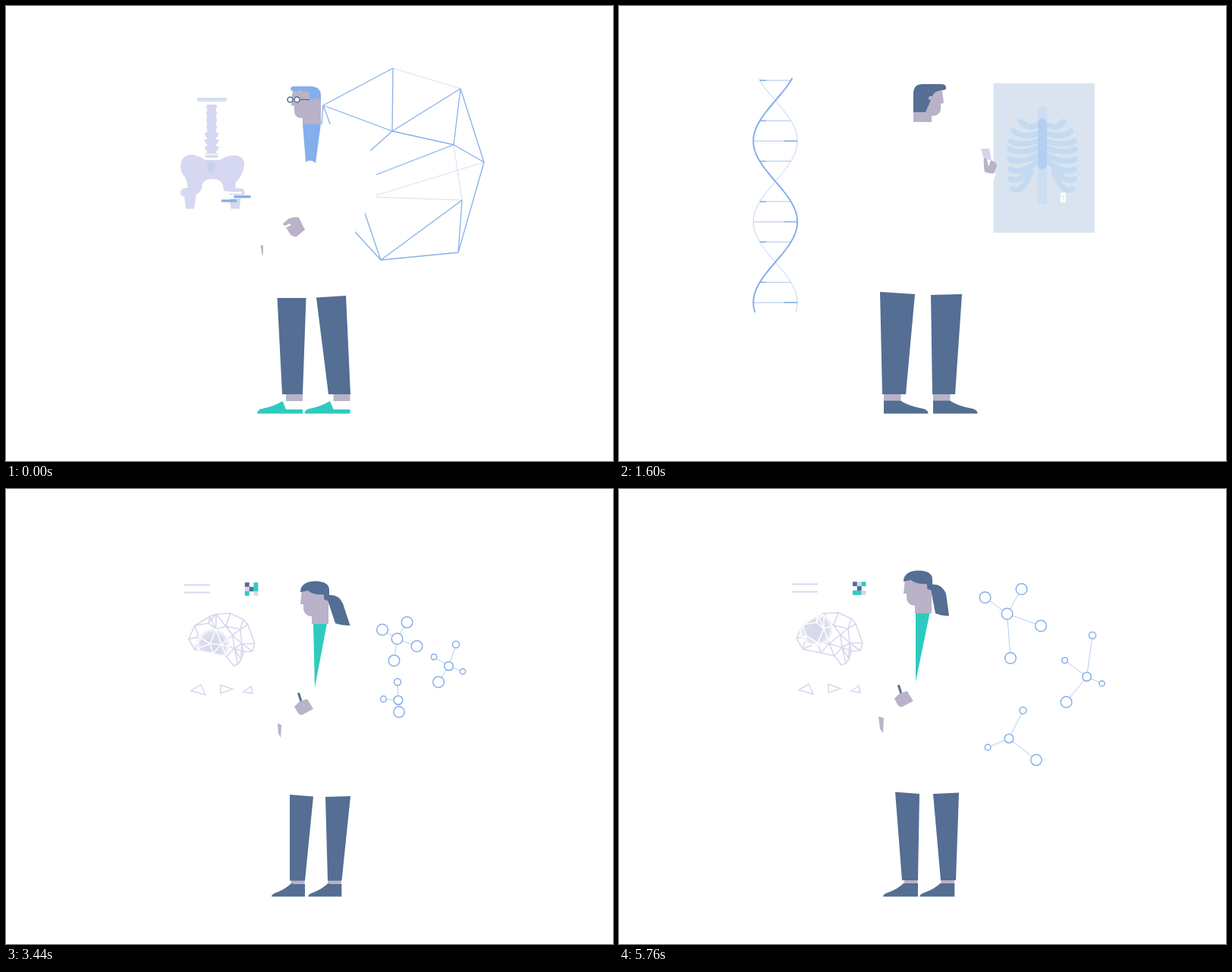
Recreate the animation shown at these times as an HTML page with a canvas. Size 800 by 600 pixels, loop 5800 ms.

```html
<!DOCTYPE html>
<html lang="en">
<head>
<meta charset="utf-8">
<title>Medical scenes</title>
<style>
  html, body { margin: 0; width: 100%; height: 100%; overflow: hidden; background: #fff; }
  canvas { display: block; }
</style>
</head>
<body>
<canvas id="stage" width="800" height="600"></canvas>
<script>
const ctx = document.getElementById('stage').getContext('2d');
const LOOP = 5800, STEP = 40, SECOND = 1500, THIRD = 3000;
const NAVY = '#546e94', SKIN = '#b9b2c8', SKY = '#84aeec', TEAL = '#2fcabf',
      LILAC = '#d6d7f0', LINE = '#86b0ea', PALE = '#ccd5ee';

const lerp = (a, b, p) => a + (b - a) * p;
const clamp = x => Math.max(0, Math.min(1, x));
const smooth = x => { x = clamp(x); return x * x * (3 - 2 * x); };
const easeOut = x => 1 - (1 - clamp(x)) ** 3;

// Value at time t along [time, value] stops.
function keyed(t, stops) {
  let i = 0;
  while (i < stops.length - 2 && t > stops[i + 1][0]) i++;
  const [t0, a] = stops[i], [t1, b] = stops[i + 1];
  return lerp(a, b, smooth((t - t0) / (t1 - t0)));
}

// Blends two paths that share the same commands.
function blend(a, b, p) {
  const ends = b.match(/-?[\d.]+/g);
  let i = 0;
  return a.replace(/-?[\d.]+/g, n => lerp(+n, +ends[i++], p).toFixed(2));
}

function fill(color, path, other, p) {
  ctx.fillStyle = color;
  ctx.fill(new Path2D(other ? blend(path, other, p) : path));
}

function stroke(color, width, path) {
  ctx.strokeStyle = color;
  ctx.lineWidth = width;
  ctx.stroke(new Path2D(path));
}

function rect(color, x, y, w, h) {
  ctx.fillStyle = color;
  ctx.fillRect(x, y, w, h);
}

function ring(x, y, r, color, width) {
  ctx.beginPath();
  ctx.arc(x, y, r, 0, 7);
  ctx.fillStyle = '#fff';
  ctx.strokeStyle = color;
  ctx.lineWidth = width;
  ctx.fill();
  ctx.stroke();
}

function moved(dx, dy, draw, angle = 0, px = 0, py = 0) {
  ctx.save();
  ctx.translate(dx + px, dy + py);
  ctx.rotate(angle * Math.PI / 180);
  ctx.translate(-px, -py);
  draw();
  ctx.restore();
}

/* ---------- Scene 1: skeleton scan and network ---------- */

// Node positions as [x, y, later x, later y].
const nodes = {
  A: [418, 131, 412, 131], B: [510, 82, 503, 81], C: [599, 109, 602, 107],
  D: [630, 206, 655, 206], E: [596, 325, 603, 325], F: [494, 335, 487, 335],
  G: [509, 165, 484, 166], H: [590, 183, 570, 184], I: [601, 256, 587, 256],
  K: [467, 256, 492, 256], L: [430, 250, 440, 252], M: [450, 218, 448, 204],
  N: [440, 241, 440, 239], O: [430, 265, 430, 279], P: [440, 190, 446, 184],
  Q: [414, 180, 412, 175], R: [444, 182, 440, 175]
};

function network(p) {
  const at = k => lerp(nodes[k][0], nodes[k][2], p) + ' ' + lerp(nodes[k][1], nodes[k][3], p);
  const path = pairs => pairs.split(' ').map(e => `M${at(e[0])}L${at(e[1])}`).join('');
  stroke(PALE, .8, path('BC HI DK IL'));
  ctx.globalAlpha = clamp(p);
  stroke(PALE, .8, path('DI'));
  ctx.globalAlpha = 1;
  stroke(LINE, 1.3, path('AB AG BG GC CH CD HD GH DE EI EF FI GM HN FK KR FO AP AQ'));
  fill('#fff',
    'M400 156 H430 Q462 160 480 190 Q486 202 488 222 L488 251 Q484 264 473 273 L460 298 L460 345 H400 Z',
    'M400 150 H425 Q456 160 468 183 Q472 202 474 226 L468 254 Q464 272 460 280 L458 306 L458 345 H400 Z', p);
}

function skeleton(p) {
  const q = clamp(p);
  const femur = 'M230 246Q230 239 240 240L251 245L248 267.500H237L235 251Q230 251 230 246Z';
  rect('#d6dff4', 252, 121, 38.5, lerp(5, 74, q));
  const bone = q > .5 ? '#c5d1ee' : LILAC;
  rect(bone, 265, lerp(130, 126, q), 12, lerp(70, 69, q));
  for (let y = 131; y < 198; y += 9) {
    const spread = y > 165 ? 9.5 : 7.5;
    fill(y < 195 ? bone : LILAC, `M${271 - spread} ${y}H${271 + spread}L${269 + spread} ${y + 6}H${273 - spread}Z`);
  }
  rect('#fff', 262, 195, 18, 1.5);
  fill(LILAC, 'M230 211Q231 196 246 196Q256 198 262 203H282Q292 196 302 197Q314 198 314 210Q312 224 303 232L302 245L287 244Q287 228 272 228Q258 228 258 240Q256 247 249 249L240 245Q240 235 236 226Q230 220 230 211Z');
  fill(LILAC, femur);
  ctx.save();
  ctx.translate(544.5, 0);
  ctx.scale(-1, 1);
  fill(LILAC, femur);
  ctx.restore();
  rect('#c6d3f0', 265, 206, 10, 12);
  rect('#fff', lerp(288, 288, q), 245, lerp(23, 19, q), 2.5);
  rect('#fff', 289, 249, 36, 5);
  rect(SKY, lerp(300.5, 284, q), 249.7, lerp(22, 40.5, q), 3.5);
  rect(SKY, 284, 255.3, lerp(20, 0, q), 3.3);
}

function manWithGlasses(p) {
  for (const x of [0, 62.5]) {
    moved(x, 0, () => {
      rect(SKIN, 369, 512, 22, 9);
      fill(TEAL, 'M331 537.500Q331 532 338 531Q353 528 364.500 521L369 532H391V537.500Z');
    });
  }
  fill(NAVY, 'M357.500 385L395.500 385L391 512L364 512Z', 'M353 381.500L391 382L391 512L364 512Z', p);
  fill(NAVY, 'M409 384.500L448 382L454 512L425 512Z', 'M406 381L445.500 379L454 512L425 512Z', p);
  fill(SKY, 'M391 155L415 155L408 207Q401 201 395 206Z', 'M388 152L412 152L406 198L398 198Q397 193 391.500 193Z', p);
  fill(SKIN, 'M335.500 315L339 316L338.500 330L337 326Z', 'M328.500 311L337 314L335.500 336L331 326Z', p);
  moved(-29.5 * p, -17 * p, () =>
    fill(SKIN, 'M365 287L373 280Q384 277 386 279L394 295L383 304Q377 305 374 300L369 292L376 289L374 287L367 290Z'),
    11 * p, 380, 290);
  moved(-3 * p, -3 * p, () => {
    fill(SKIN, 'M378 112L400 110L415 121V156H391V148Q380 148 380 138V132L376 131L377 118Z');
    fill(SKY, 'M375 110Q375 106 379 106H403Q415 107 415 118V126L411 121L400 124V114Q396 111 392 113Q387 109 384 113L377 112Z');
    ring(374.5, 123.5, 3.5, NAVY, 1.5);
    ring(383.5, 123.5, 3.5, NAVY, 1.5);
    stroke(NAVY, 1.3, 'M387 123.500H400');
  }, -4 * p, 403, 156);
}

function sceneOne(t) {
  const p = t / 1080;
  network(p);
  skeleton(p);
  manWithGlasses(Math.min(p, 1.1));
}

/* ---------- Scene 2: helix and X-ray ---------- */

function helix(centre, low) {
  const period = 213, swing = 29;
  const offset = y => swing * Math.cos(2 * Math.PI * (y - low) / period);
  const strand = sign => {
    let path = '';
    for (let y = 95; y <= 404; y += 3) path += `${path ? 'L' : 'M'}${centre + sign * offset(y)} ${y}`;
    return path;
  };
  stroke('#c4d3f1', 1, strand(1));
  for (let i = -24; i < 24; i++) {
    const y = low + i * period / 8;
    if (i % 4 === 2 || i % 4 === -2 || y < 95 || y > 404) continue;
    const w = Math.abs(offset(y));
    stroke('#bdd1f1', 1.2, `M${centre - w} ${y}H${centre + w}`);
    const start = i % 4 ? -w : w * .4;
    stroke(LINE, 1.5, `M${centre + start} ${y}h${i % 4 ? 8 : w * .6}`);
  }
  stroke(LINE, 2, strand(-1));
}

function xray(p, slide) {
  ctx.save();
  ctx.translate(572 + slide, 200.5);
  ctx.scale(lerp(1.075, 1, p), lerp(1.031, 1, p));
  ctx.translate(-572, -200.5);
  rect('#d9e4f0', 448, 105, 124, 191);
  rect('#cbdef2', 502.5, 135, 11, 124);
  ctx.lineCap = 'round';
  // Each rib: start drop, tip reach, tip height.
  [[158, 26, 154], [169, 35, 166], [179, 39, 179], [188, 40, 189], [197, 40, 202],
   [205, 39, 215], [211, 39, 227], [218, 36, 240]].forEach(([y, reach, tip], i) => {
    for (const side of [-1, 1]) {
      const from = 508 + side * (i > 5 ? 14 : 6);
      stroke('#c4daf1', 7, `M${from} ${y}Q${508 + side * reach * .7} ${Math.max(y, tip) + 7} ${508 + side * reach} ${tip}`);
    }
  });
  ctx.lineCap = 'butt';
  fill('#b3cff0', 'M502.500 155Q503 150 508 150Q513 150 513.500 155V211Q512 215 508 215Q504 215 502.500 211Z');
  ctx.restore();

  ctx.save();
  ctx.translate(lerp(530.5, 533.5, p) + slide, lerp(252.5, 251, p));
  const w = lerp(7, 45, p), h = lerp(13, 28, p);
  rect('#fff', -w / 2, -h / 2, w, h);
  rect('#d3e1f1', 3 - w / 2, 3 - h / 2, Math.max(1, w - 6), h - 6);
  if (p > .3) {
    const q = clamp((p - .3) / .7);
    rect('#fff', -16.5, -7.5, 24 * q, 2.5);
    rect('#fff', -16.5, -2, 33 * q, 2.5);
    rect(SKY, -16.5, 3.5, 19 * q, 3);
  }
  ctx.restore();
}

function manAtScreen(p) {
  fill('#fff',
    'M410 155H439Q467 154 475 180L482 219L497 220Q486 250 483 258Q480 265 473 265H461L465 301H400Z',
    'M410 160H448Q470 168 477 205L479 230L480 236Q476 250 462 262Q462 264 461 265H459L461 301H400Z', p);
  ctx.globalAlpha = 1 - p;
  fill('#d3d6ea', 'M477 188L488 188L491 203L481 202Z');
  ctx.globalAlpha = 1;
  fill(SKIN,
    'M482 219Q480 208 481 200L485 202L487 212L490 203L497 207L498 211L494 221Q488 221 482 219Z',
    'M437 262Q438 256 448 251L470 237L470 233L473 227L476 227L474 234L480 235Q478 250 460 263Q439 275 437 262Z', p);
  for (const [x0, x1] of [[349, 352.5], [414, 410.5]]) {
    moved(lerp(x0, x1, p), 0, () => {
      ctx.scale(lerp(1, .9, p), 1);
      rect(SKIN, 0, 511, 22.5, 10);
      fill(NAVY, 'M0 520.500H22Q34 528 52 531Q59 533 58.500 537.500H0Z');
    });
  }
  fill(NAVY, 'M344 377L390 380L378 512L347 512Z', 'M348 385Q370 388 392 386L381 512L351 512Z'.replace('Q370 388 392 386', 'L392 386'), p);
  fill(NAVY, 'M411 381L452 380L443 512L413 512Z', 'M407 385L448 380L438 512L409 512Z', p);
  ctx.globalAlpha = smooth((p - .6) / .4);
  ctx.lineCap = 'round';
  stroke('#a9b8cf', 4, 'M358 484Q370 484 382 482M410 478.500L440 473');
  ctx.lineCap = 'butt';
  ctx.globalAlpha = 1;
  moved(p, p, () => {
    fill(SKIN, 'M388 139H404L409 110L426 111L427 120L428 128L424 129V136Q423 145 412 145V153H388Z');
    fill(NAVY, 'M388 140V114Q389 103 400 103H426Q432 104 431 109Q430 111 425 111Q415 112 413 119Q408 118 408 122Q408 124 411 124L404 140Z');
  }, 3 * p, 400, 153);
}

function sceneTwo(t) {
  const local = t - SECOND, p = smooth((t - 2120) / 640);
  const drift = keyed(local, [[0, -82], [280, 4], [620, 3], [1260, 0]]);
  helix(263 + drift, lerp(337, 270.5, (t - 2120) / 640));
  xray(p, 185 * (1 - easeOut(local / 300)));
  manAtScreen(p);
}

/* ---------- Scene 3: brain panel and molecules ---------- */

const brain = [[234, 197], [242, 179], [262, 167], [270, 164], [289, 163], [306, 171], [312, 178],
  [321, 203], [318, 213], [306, 214], [303, 224], [299, 230], [293, 232], [284, 220], [266, 216], [242, 211],
  [247, 194], [260, 176], [270, 184], [262, 203], [277, 204], [283, 180], [292, 192], [302, 184], [304, 203], [294, 209]];
const RIM = 16;
const brainRim = 'M' + brain.slice(0, RIM).map(v => v.join(' ')).join('L') + 'Z';
let brainMesh = brainRim;
brain.forEach(([x, y], i) => {
  for (const [u, v] of brain.slice(Math.max(RIM, i + 1)))
    if (Math.hypot(x - u, y - v) < 22) brainMesh += `M${x} ${y}L${u} ${v}`;
});

function brainPanel(t) {
  stroke(LILAC, 2, 'M228 125.500H262M228 135.500H262');
  stroke(LILAC, 1.5, 'M237 265L250 257L256 270.500ZM276 257.500L292 263L276 268.500ZM306 266.500L316 259.500L318 268.500Z');

  const cells = ['d.tldtt.l', 'dlt.d.ttl'][Math.floor((t - THIRD) / 160) % 2];
  const tint = { d: NAVY, t: TEAL, l: LILAC };
  [...cells].forEach((c, i) => {
    if (tint[c]) rect(tint[c], 308 + i % 3 * 5.8, 122.3 + Math.floor(i / 3) * 5.8, 5.9, 5.9);
  });

  stroke(LILAC, 1.6, brainMesh);
  const x = keyed(t, [[3440, 266], [4200, 293], [5540, 293], [5760, 260]]);
  const y = keyed(t, [[3440, 205], [4200, 172], [5540, 172], [5760, 185]]);
  const glow = ctx.createRadialGradient(x, y, 5, x, y, 23);
  glow.addColorStop(0, '#d7d8e8');
  glow.addColorStop(.6, '#dcdded');
  glow.addColorStop(1, '#ffffff');
  ctx.save();
  ctx.beginPath();
  ctx.arc(x, y, 22, 0, 7);
  ctx.clip();
  fill(glow, brainRim);
  stroke('#fff', 1.5, brainMesh);
  ctx.restore();
}

// Atoms as [x, y, later x, later y, radius]; the first one is the hub.
const molecules = [
  [[515.5, 197.5, 511.5, 164.5, 7.3], [496, 185.5, 482.5, 143, 7.3], [528.5, 175.7, 530.5, 132, 7.3],
   [541.5, 207.3, 556, 180.5, 7.3], [511.5, 226.3, 516, 223, 7.3]],
  [[583.5, 233.5, 616.5, 247.5, 5.8], [593, 205, 624, 193, 4.5], [564, 221.5, 587.5, 226, 3.8],
   [602, 240.7, 636.5, 256.5, 3.6], [570, 254.5, 589.5, 281, 7.3]],
  [[517, 278.5, 514, 329, 5.8], [516, 254.5, 532.5, 292, 4.5], [497.5, 277, 486, 340.7, 3.9],
   [518, 294, 550, 357.3, 7.2]]
];

function drawMolecules(p) {
  for (const atoms of molecules) {
    const spots = atoms.map(([x, y, u, v, r]) => [lerp(x, u, p), lerp(y, v, p), r]);
    const [hx, hy] = spots[0];
    for (const [x, y] of spots.slice(1)) stroke('#b3cdf1', 1, `M${hx} ${hy}L${x} ${y}`);
    for (const [x, y, r] of spots) ring(x, y, r, LINE, 1.5);
  }
}

function womanWithPen(lean, rise) {
  for (const x of [0, 48.3]) {
    moved(x, 0, () => {
      rect(SKIN, 376, 515, 17.5, 6);
      fill(NAVY, 'M350 537.500Q350 534 357 532Q369 527 376 520L380 521H394V537.500Z',
        'M348 537.500Q348 534 355 532Q368 527 375 520L380 520H394V537.500Z', rise);
    });
  }
  const leg = (a, b, c) => fill(NAVY, blend(a, b, lean), c, rise);
  leg('M374 403L405 405.500L394 516.500L374 516.500Z', 'M365.500 404L397 406L394 516.500L375 516.500Z', 'M364 399.500L396 402L394 516L373 516Z');
  leg('M421 406L454 405L442.500 516.500L424 516.500Z', 'M414 406L446.500 404.500L442.500 516.500L424 516.500Z', 'M414 402L448 400.500L444 516L424 516Z');
  fill(SKIN, blend('M358 309L363 311L362 328L359 322Z', 'M344 308L351 310L349.500 330L346 324Z', lean),
    'M342 300L349 302L348 322L344 316Z', rise);
  fill(TEAL, blend('M405 177L423 177L407 262Z', 'M391 177L409.500 177L392 262Z', lean),
    'M391 164L409.500 164L391 254Z', rise);
  moved(-15.7 * lean - 1.5 * rise, -2 * lean - 8.5 * rise, () => {
    stroke(NAVY, 3, 'M385.500 269L389 280');
    fill(SKIN, 'M380 287L387 280L397 277L405 290L390 298Q386 298 384 294Z');
  });
  moved(-12.5 * lean - .5 * rise, -.5 * lean - 13.5 * rise, () => {
    fill(NAVY, 'M424 140Q438 138 444 151L453.500 180Q441 180 434 177L424 147Z',
      'M424 140Q438 138 444 152L448 181.500Q437 181 430 178L424 147Z', lean);
    fill(SKIN, 'M390 133L420 137L425 150V178H403V168Q392 167 392 156V152L388 152Z');
    fill(NAVY, 'M388 136Q388 122 408 121.500Q426 122 426 133V148L420 146Q418 144 418 139Q404 140 398 134Z');
    ctx.beginPath();
    ctx.arc(416.5, 142, 2.8, 0, 7);
    ctx.fillStyle = SKIN;
    ctx.fill();
  });
}

function sceneThree(t) {
  const local = t - THIRD;
  const drift = keyed(local, [[0, -68], [260, 9], [440, 6.8], [900, 0]]);
  const entry = 1 - easeOut(local / 380);
  moved(drift, Math.max(0, drift / 7), () => brainPanel(t));
  moved(63 * entry, 0, () => drawMolecules(easeOut((t - 3440) / 750)));
  moved(20 * entry, 0, () => womanWithPen(smooth((t - 3440) / 1000), smooth((t - 5520) / 240)));
}

function frame(now) {
  const t = Math.floor(now % LOOP / STEP) * STEP;
  ctx.fillStyle = '#fff';
  ctx.fillRect(0, 0, 800, 600);
  (t < SECOND ? sceneOne : t < THIRD ? sceneTwo : sceneThree)(t);
  requestAnimationFrame(frame);
}
requestAnimationFrame(frame);
</script>
</body>
</html>
```
